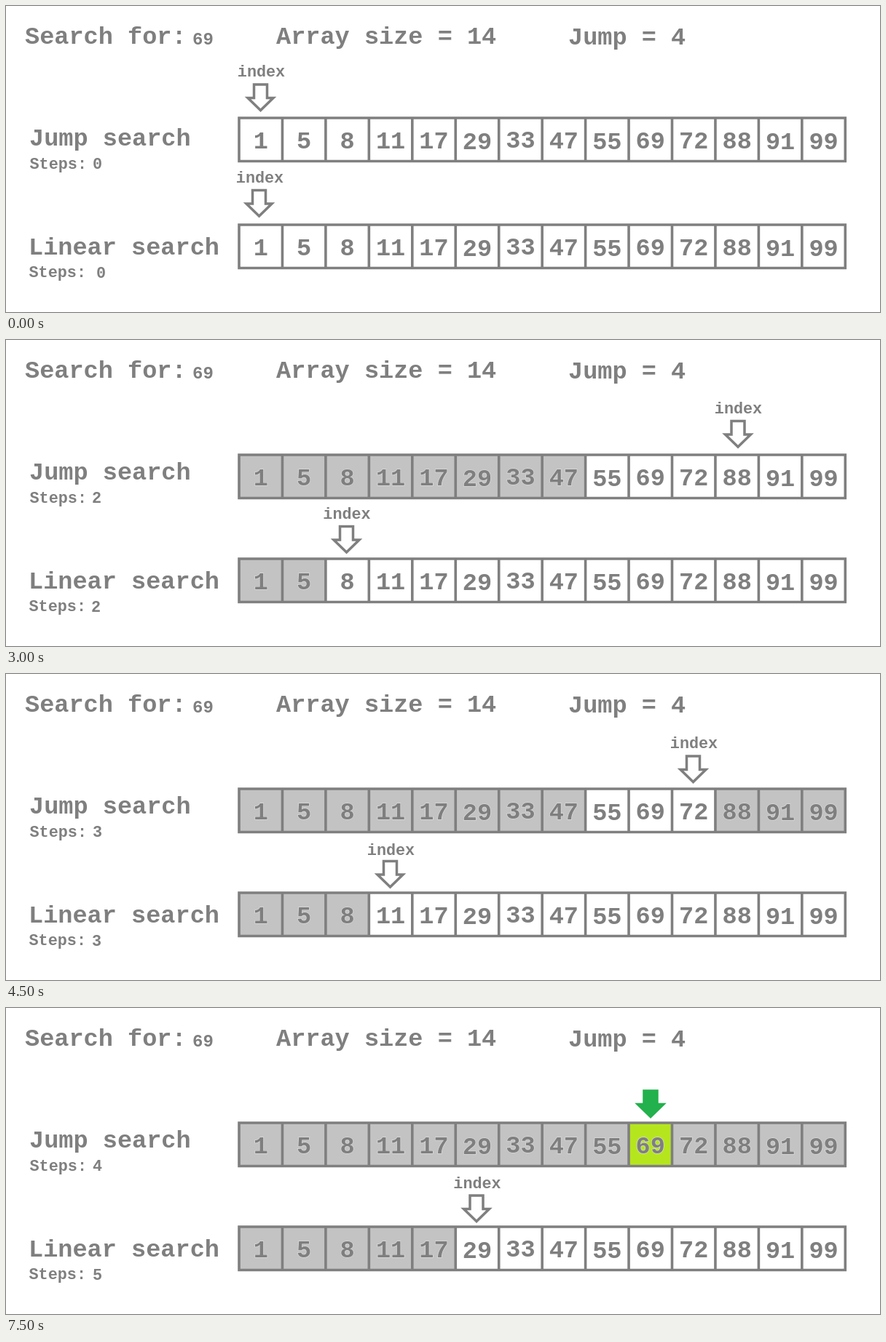
An HTML page that plays this animation: 1200 px wide and 421 px high, repeating every 8 s.

```html
<!DOCTYPE html>
<html lang="en">
<head>
<meta charset="utf-8">
<title>Jump search and linear search</title>
<style>
  html, body { margin: 0; width: 100%; height: 100%; overflow: hidden; background: #fff; }
  svg { display: block; width: 100vw; height: 100vh; }
  text { font: bold 33.6px "Liberation Mono", "Courier New", monospace; fill: #7f7f7f; }
  .mid { text-anchor: middle; }
  .small { font-size: 21.8px; }
  .dim { stroke: #dcdcdc; stroke-width: 1.4px; paint-order: stroke; }
</style>
</head>
<body>
<svg id="stage" viewBox="0 0 1200 421"></svg>
<script>
const INK = '#7f7f7f', GREY = '#c3c3c3', LIME = '#b5e61d', GREEN = '#22b14c';
const values = [1, 5, 8, 11, 17, 29, 33, 47, 55, 69, 72, 88, 91, 99];
const sag = [0, 0, 0, 0, 0, 1, -1, 0, 1, 0, 0, 0, 1, 1];
const LEFT = 320, CELL = 59.45, HIGH = 59.5, FOUND = 9;
const STEP = 1500, LOOP = 8000;

// tip: arrow point, label: centre and baseline of "index", count: x of the step counter
const jump = [
  { top: 154, tip: [349.5, 146], label: [350.5, 97], count: 119 },
  { top: 158, tip: [767, 149.5], label: [767.5, 101], count: 117 },
  { top: 158, tip: [1005, 149.5], label: [1005.5, 101], count: 118 },
  { top: 158, tip: [943.5, 151], label: [944.5, 102], count: 119 },
  { top: 158, tip: [885, 152], count: 119 }
];
const linear = [
  { tip: [347.5, 291.5], label: [348.5, 243], count: 124 },
  { tip: [410.5, 294.5], label: [411.5, 246], count: 114 },
  { tip: [467.5, 294.5], label: [468, 246], count: 117 },
  { tip: [527.5, 295.5], label: [528.5, 249], count: 118 },
  { tip: [587, 297], label: [587, 248], count: 120 },
  { tip: [646, 296], label: [647, 248], count: 119 }
];

const text = (s, x, y, cls = '', extra = '') =>
  `<text x="${x}" y="${y}" class="${cls}" ${extra}>${s}</text>`;

function row(top, dimmed, found) {
  let cells = '', digits = '', bars = '';
  values.forEach((v, i) => {
    const x = LEFT + i * CELL, hit = found && i === FOUND, dim = dimmed(i);
    const fill = hit ? LIME : dim ? GREY : '#fff';
    cells += `<rect x="${x}" y="${top}" width="${CELL}" height="${HIGH}" fill="${fill}"/>`;
    digits += text(v, x + CELL / 2, top + 41.5 + sag[i], dim || hit ? 'mid dim' : 'mid');
    if (i) bars += `M${x} ${top}v${HIGH}`;
  });
  return cells + digits + `<path d="M${LEFT} ${top}h${14 * CELL}v${HIGH}h${-14 * CELL}z${bars}"
    fill="none" stroke="${INK}" stroke-width="3.6"/>`;
}

function pointer({ tip: [x, y], label }) {
  const paint = label ? `fill="#fff" stroke="${INK}"` : `fill="${GREEN}" stroke="${GREEN}"`;
  return `<path d="M${x} ${y - 2.5}l-17.5 -17h8.5v-18.5h18v18.5h8.5z" ${paint} stroke-width="3.5"/>`
    + (label ? text('index', ...label, 'mid small') : '');
}

function scene(n) {
  const j = Math.min(n, 4), a = jump[j], b = linear[n];
  const skipped = i => j === 4 ? i !== FOUND : i < 4 * Math.min(j, 2) || j === 3 && i > 10;
  return text('Search for:', 26, 52) + text('69', 256, 53, '', 'style="font-size:24px"')
    + text('Array size = 14', 371, 52) + text('Jump = 4', 772, 53)
    + text('Jump search', 32, 192) + text('Steps:', 32.5, 224, 'small')
    + text(j, a.count, 224, 'small')
    + text('Linear search', 31, 342) + text('Steps:', 31.5, 373, 'small')
    + text(n, b.count, 374, 'small')
    + row(a.top, skipped, j === 4) + row(301, i => i < n, false)
    + pointer(a) + pointer(b);
}

const stage = document.getElementById('stage');
let shown = -1;
function draw() {
  const n = Math.floor(performance.now() % LOOP / STEP);
  if (n !== shown) stage.innerHTML = scene(shown = n);
  requestAnimationFrame(draw);
}
draw();
</script>
</body>
</html>
```
